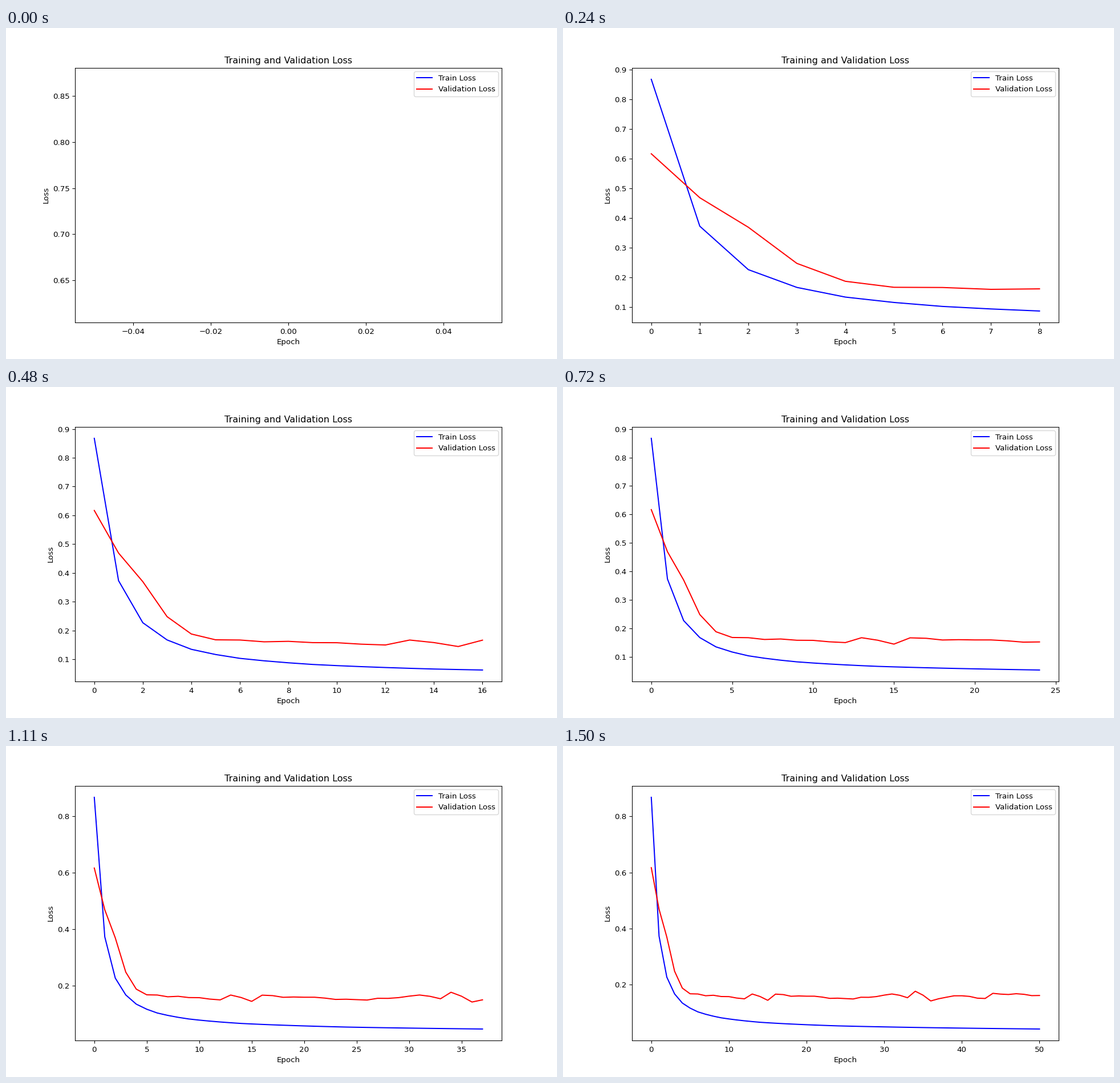
Write a matplotlib script that moves like this. It is 966 by 580 pixels and loops after 1530 ms.

```python
import matplotlib.pyplot as plt
import numpy as np
from matplotlib.animation import FuncAnimation

WIDTH, HEIGHT, DPI = 966, 580, 96
STEP_MS = 30
EPOCHS = np.arange(51)


def train_losses():
    """Power-law decay, straight on log-log axes between a few knots."""
    knots = np.array([0, 1, 2, 3, 4, 6, 9, 14, 24, 50])
    losses = [0.8677, 0.3731, 0.2269, 0.1671, 0.1345,
              0.1031, 0.0819, 0.0660, 0.0532, 0.0420]
    return np.exp(np.interp(np.log1p(EPOCHS), np.log1p(knots), np.log(losses)))


def valid_losses():
    """Steep descent, then a plateau of large swings with slight jitter."""
    knots = [0, 1, 2, 3, 4, 5, 12, 13, 15, 16, 26, 31, 33, 34, 36, 39, 43, 44, 50]
    losses = [0.617, 0.469, 0.3696, 0.248, 0.1877, 0.1675, 0.150, 0.165, 0.145, 0.1635,
              0.149, 0.166, 0.153, 0.178, 0.142, 0.162, 0.151, 0.170, 0.160]
    jitter = np.random.default_rng(4).uniform(-0.003, 0.003, EPOCHS.size)
    return np.interp(EPOCHS, knots, losses) + np.where(EPOCHS > 5, jitter, 0)


plt.rcParams["font.family"] = "DejaVu Sans"
fig, ax = plt.subplots(figsize=(WIDTH / DPI, HEIGHT / DPI), dpi=DPI)
curves = [
    (ax.plot([], [], color="blue", label="Train Loss")[0], train_losses()),
    (ax.plot([], [], color="red", label="Validation Loss")[0], valid_losses()),
]
ax.set_title("Training and Validation Loss")
ax.set_xlabel("Epoch")
ax.set_ylabel("Loss")
ax.legend(loc="upper right")


def update(epoch):
    """Show all losses up to this epoch and refit the axes."""
    count = epoch + 1
    for line, losses in curves:
        line.set_data(EPOCHS[:count], losses[:count])
    ax.relim()
    ax.autoscale_view()
    return [line for line, _ in curves]


anim = FuncAnimation(fig, update, frames=EPOCHS.size, init_func=lambda: update(0),
                     interval=STEP_MS, repeat=True, repeat_delay=0)
plt.show()
```
